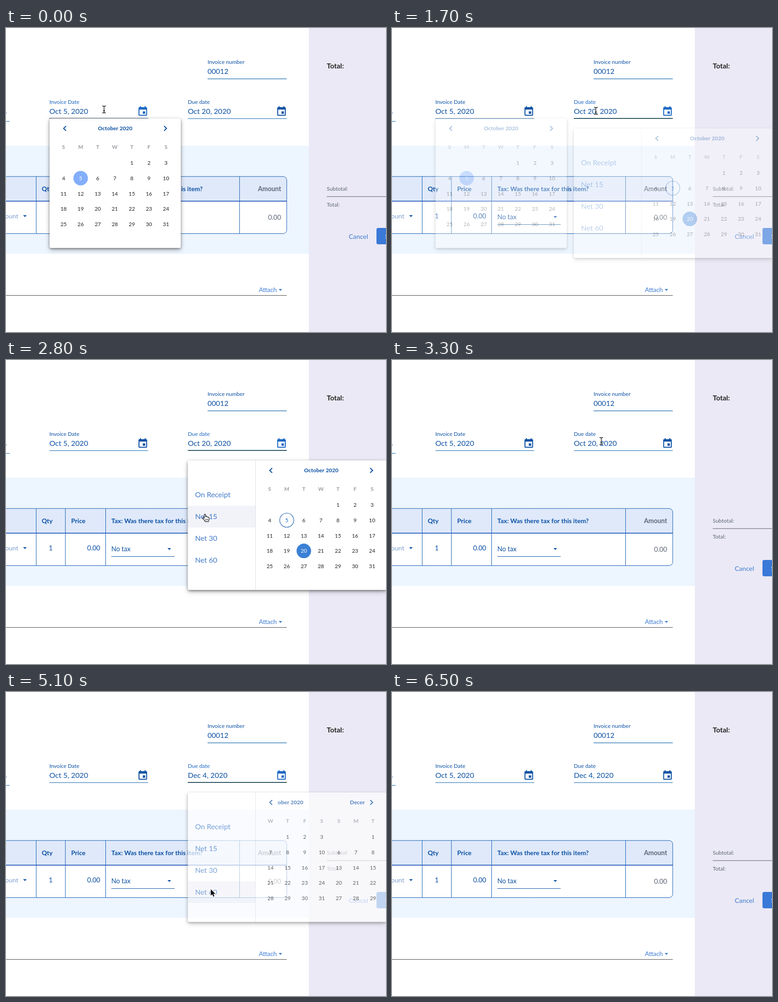
Animation, 837 px wide and 669 px high, one loop 6.6 s. Source, as an HTML page with a canvas:

```html
<!DOCTYPE html>
<html lang="en">
<head>
<meta charset="utf-8">
<title>Invoice due date</title>
<style>
html, body { margin: 0; width: 100%; height: 100%; overflow: hidden; background: #fff; }
canvas { display: block; }
</style>
</head>
<body>
<canvas id="stage" width="837" height="669"></canvas>
<script>
const W = 837, H = 669, LOOP = 6600, STEP = 100;
const screen = document.getElementById('stage').getContext('2d');
const layer = document.createElement('canvas');
layer.width = W;
layer.height = H;
const layerCtx = layer.getContext('2d');
let g = screen;

const NAVY = '#0b50a4', BLUE = '#1a66c4', LINK = '#3a7ad0', LINE = '#0a62a8', GRID = '#0f5aac', GREY = '#5e6778';
const COL = 37.6, ROW = 33.8, ITEM_TOP = 273, ITEM_H = 47.8;
const TERMS = ['On Receipt', 'Net 15', 'Net 30', 'Net 60'];
const OCT = { name: 'October 2020', first: 4, days: 31 };
const DEC = { name: 'December 2020', first: 2, days: 31 };
const SLIDE_AT = 5000;

// Pointer path: time, x, y of the hot spot
const PATH = [
  [0, 216, 179], [300, 216, 179], [1100, 449, 182], [1800, 449, 182],
  [2400, 438, 339], [2900, 438, 339], [3250, 461, 178], [3600, 461, 178],
  [4300, 455, 378], [4700, 451, 434], [5700, 451, 434]
];

const EVENT_ICON = new Path2D('M17 12h-5v5h5v-5zM16 1v2H8V1H6v2H5c-1.11 0-1.99.9-1.99 2L3 19c0 1.1.89 2 2 2h14c1.1 0 2-.9 2-2V5c0-1.1-.9-2-2-2h-1V1h-2zm3 18H5V8h14v11z');
const ARROW = new Path2D('M0 0V14.2L3.3 11.1L5.6 16.4L8 15.3L5.7 10.2H10.2Z');
const HAND = new Path2D('M2.2 9.6V1.6C2.2-.4 5-.4 5 1.6V6C5.2 4.8 7.6 4.9 7.7 6.5C8.2 5.5 10.3 5.8 10.4 7.3C11.2 6.5 12.9 7 12.9 8.6V11.6C12.9 13.6 11.5 14.4 11.4 16.6H4.2C4 14.4 1.5 13-.9 9.9C-2.2 8.2-.2 6.9 1 8.3Z');
const IBEAM = new Path2D('M-4-7.5C-1.5-7.5 0-7 0-5.5C0-7 1.5-7.5 4-7.5M0-5.5V6M-4 8C-1.5 8 0 7.5 0 6C0 7.5 1.5 8 4 8M-2 3H2');

const clamp = v => Math.max(0, Math.min(1, v));
const ramp = (t, from, to) => clamp((t - from) / (to - from));
const smooth = p => p * p * (3 - 2 * p);

function text(s, x, y, size, color, weight = 400, align = 'left') {
  g.font = `${weight} ${size}px Lato, "Open Sans", sans-serif`;
  g.textAlign = align;
  g.fillStyle = color;
  g.fillText(s, x, y + size * 0.36);
}

function rect(x, y, w, h, color) {
  g.fillStyle = color;
  g.fillRect(x, y, w, h);
}

function rounded(x, y, w, h, r) {
  g.beginPath();
  g.roundRect(x, y, w, h, r);
}

function caret(x, y, color) {
  g.fillStyle = color;
  g.beginPath();
  g.moveTo(x - 4, y - 2);
  g.lineTo(x + 4, y - 2);
  g.lineTo(x, y + 2);
  g.fill();
}

function icon(x, y, color) {
  g.save();
  g.translate(x, y);
  g.scale(1.05, 1.05);
  g.fillStyle = color;
  g.fill(EVENT_ICON);
  g.restore();
}

function chevron(x, y, dir) {
  g.strokeStyle = NAVY;
  g.lineWidth = 2.1;
  g.beginPath();
  g.moveTo(x - dir * 2.8, y - 5.3);
  g.lineTo(x + dir * 2.6, y);
  g.lineTo(x - dir * 2.8, y + 5.3);
  g.stroke();
}

function disc(x, y, r, fill, stroke) {
  g.beginPath();
  g.arc(x, y, r, 0, Math.PI * 2);
  if (fill) { g.fillStyle = fill; g.fill(); }
  if (stroke) { g.strokeStyle = stroke; g.lineWidth = 1.2; g.stroke(); }
}

function field(label, value, x, w, focused) {
  text(label, x, 162.5, 12, focused ? BLUE : NAVY);
  text(value, x, 183, 16.2, NAVY);
  icon(x + w - 24.3, 171, focused ? BLUE : NAVY);
  if (focused) rect(x, 198, w, 2, '#2b5563');
  else rect(x, 199, w, 1, LINE);
}

function drawPage(due, focus) {
  rect(0, 0, W, H, '#fff');
  rect(0, 259, 667, 238, '#edf5fe');
  rect(667, 0, 170, H, '#ebe9f5');

  text('Invoice number', 444, 75, 12, NAVY);
  text('00012', 444, 95.5, 15.8, NAVY);
  rect(444, 111.3, 174.5, 1.2, LINE);
  rect(0, 186, 1, 2, NAVY);
  rect(0, 205, 8, 1, LINE);
  field('Invoice Date', 'Oct 5, 2020', 95.5, 217.5, focus === 1);
  field('Due date', due, 400.5, 218, focus === 2);

  rounded(-20, 327, 638.5, 125.5, 8);
  g.save();
  g.clip();
  rect(0, 327, 620, 54, '#dfe9fa');
  rect(0, 381, 620, 72, '#fff');
  for (const x of [66, 130.3, 219, 514]) rect(x, 327, 1, 126, GRID);
  rect(0, 380.2, 620, 1.8, '#2359bb');
  g.restore();
  rounded(-20, 326.8, 638.3, 125.7, 8);
  g.strokeStyle = GRID;
  g.lineWidth = 1;
  g.stroke();

  text('Qty', 78.7, 354, 14.1, NAVY, 700);
  text('Price', 143.5, 354, 14.1, NAVY, 700);
  text('Tax: Was there tax for this item?', 232, 354, 14.1, NAVY, 700);
  text('Amount', 606, 354, 14.2, GREY, 700, 'right');
  text('ount', 27, 413.5, 14.2, '#7d9fd0', 400, 'right');
  caret(41.7, 414, NAVY);
  text('1', 98.5, 413.5, 14.6, NAVY, 400, 'center');
  text('0.00', 207.5, 413.5, 14.6, NAVY, 400, 'right');
  text('No tax', 232, 415.5, 14.4, NAVY);
  caret(359.7, 416, NAVY);
  rect(232, 432, 139.5, 1, NAVY);
  text('0.00', 606, 416.5, 14.6, GREY, 400, 'right');

  text('Attach', 557, 576.5, 13.8, LINK);
  caret(604.5, 576.5, LINK);
  rect(0, 588, 618.5, 1, '#454545');

  text('Total:', 706.5, 83.5, 15.5, '#222', 700);
  text('Subtotal:', 706.5, 353.5, 12, GREY);
  rect(706.5, 370.5, 131, 1, '#55555f');
  text('Total:', 706.5, 388.5, 12, GREY);
  text('Cancel', 755, 458.5, 14.3, LINK);
  rounded(816, 440, 40, 36, 4);
  g.fillStyle = '#3a79d8';
  g.fill();
  text('S', 835, 458.5, 14.3, '#fff');
}

function panel(x, y, w) {
  g.save();
  g.fillStyle = '#fff';
  for (const [color, blur, dy] of [['rgba(0,0,0,.28)', 11, 4], ['rgba(0,0,0,.36)', 5, 2]]) {
    g.shadowColor = color;
    g.shadowBlur = blur;
    g.shadowOffsetY = dy;
    rounded(x, y, w, 285, 3);
    g.fill();
  }
  g.restore();
}

function month(m, x, y, marked, fill) {
  'SMTWTFS'.split('').forEach((d, i) => text(d, x + 30.8 + i * COL, y + 63, 11.6, '#999ca2', 700, 'center'));
  for (let d = 1; d <= m.days; d++) {
    const n = d + m.first - 1;
    const cx = x + 30.8 + (n % 7) * COL;
    const cy = y + 97.7 + Math.floor(n / 7) * ROW;
    let color = '#222';
    if (d === marked) {
      disc(cx, cy, 16, fill);
      color = '#fff';
    } else if (m === OCT && d === 5) {
      disc(cx, cy, 15.5, null, '#2864b8');
      color = BLUE;
    }
    text(d, cx, cy, 11.8, color, 400, 'center');
  }
}

function calendar(x, y, slide, marked, fill) {
  chevron(x + 33.5, y + 22, -1);
  chevron(x + 255, y + 22, 1);
  const clipped = (left, width, draw) => {
    g.save();
    g.beginPath();
    g.rect(x + left, y, width, 285);
    g.clip();
    draw();
    g.restore();
  };
  const titleX = x + 144.4 - slide * 184;
  clipped(48, 192, () => {
    text(OCT.name, titleX, y + 22, 12.1, NAVY, 700, 'center');
    if (slide) text(DEC.name, titleX + 184, y + 22, 12.1, NAVY, 700, 'center');
  });
  const span = COL * 7, gridX = x - slide * span;
  clipped(12, 276, () => {
    month(OCT, gridX, y, slide ? 0 : marked, fill);
    if (slide) month(DEC, gridX + span, y, 4, fill);
  });
}

function pointer(t) {
  let i = 0;
  while (i < PATH.length - 2 && t >= PATH[i + 1][0]) i++;
  const a = PATH[i], b = PATH[i + 1];
  const p = smooth(ramp(t, a[0], b[0]));
  return { x: a[1] + (b[1] - a[1]) * p, y: a[2] + (b[2] - a[2]) * p };
}

const duePopup = t => Math.max(
  ramp(t, 1600, 1900) * (1 - ramp(t, 2900, 3220)),
  ramp(t, 3600, 3900) * (1 - ramp(t, SLIDE_AT, SLIDE_AT + 320)));

const itemAt = p => p.x > 400 && p.x < 549 ? Math.floor((p.y - ITEM_TOP) / ITEM_H) : -1;

// Row highlights trail the pointer by a short fade
function hover(t, item) {
  let sum = 0;
  for (let k = 0; k < 4; k++) sum += itemAt(pointer(t - k * 80)) === item;
  return sum / 4;
}

function drawDuePopup(t) {
  panel(400.5, 221, 437);
  TERMS.forEach((name, i) => {
    const y = ITEM_TOP + i * ITEM_H;
    rect(400.5, y, 149, ITEM_H, `rgba(75,90,165,${0.07 * hover(t, i)})`);
    text(name, 416.5, y + 23.7, 16, '#4079c6');
  });
  rect(549, 221, 1, 285, '#dcdde1');
  const slide = 1 - Math.pow(1 - ramp(t, SLIDE_AT, SLIDE_AT + 600), 3);
  calendar(550, 221, slide, 20, '#3b80d5');
}

function fade(alpha, draw) {
  if (alpha <= 0) return;
  g = layerCtx;
  g.clearRect(0, 0, W, H);
  draw();
  g = screen;
  g.globalAlpha = alpha;
  g.drawImage(layer, 0, 0);
  g.globalAlpha = 1;
}

function drawPointer(t, open) {
  if (t >= 5700) return;
  const p = pointer(t), item = itemAt(p);
  const inField = p.y > 160 && p.y < 200 && (p.x < 290 || p.x > 398);
  g.save();
  g.translate(p.x, p.y);
  g.lineJoin = 'round';
  if (inField) {
    g.strokeStyle = 'rgba(255,255,255,.8)';
    g.lineWidth = 3;
    g.stroke(IBEAM);
    g.strokeStyle = '#111';
    g.lineWidth = 1.3;
    g.stroke(IBEAM);
  } else if (item >= 0 && item < TERMS.length && open && t < SLIDE_AT + 100) {
    g.translate(-3.5, 0);
    g.fillStyle = '#fff';
    g.fill(HAND);
    g.strokeStyle = '#111';
    g.lineWidth = 1.2;
    g.stroke(HAND);
    g.beginPath();
    for (const x of [5.3, 7.6, 9.9]) {
      g.moveTo(x, 10.5);
      g.lineTo(x, 14);
    }
    g.lineWidth = 0.9;
    g.stroke();
  } else {
    g.strokeStyle = '#fff';
    g.lineWidth = 2;
    g.stroke(ARROW);
    g.fillStyle = '#111';
    g.fill(ARROW);
  }
  g.restore();
}

function render(t) {
  const left = 1 - ramp(t, 1500, 1800), right = duePopup(t);
  const focus = t < 1500 ? 1 : (t >= 1600 && t < 3000) || (t >= 3600 && t < 5200) ? 2 : 0;
  drawPage(t < SLIDE_AT ? 'Oct 20, 2020' : 'Dec 4, 2020', focus);
  fade(left, () => {
    panel(96, 199, 289);
    calendar(96, 199, 0, 5, '#83aefc');
    rect(96, 198, 217, 1, '#3c4a58');
  });
  fade(right, () => drawDuePopup(t));
  drawPointer(t, right > 0.5);
}

const start = performance.now();
function tick() {
  const t = (performance.now() - start) % LOOP;
  render(Math.floor(t / STEP) * STEP);
  requestAnimationFrame(tick);
}
tick();
</script>
</body>
</html>
```
